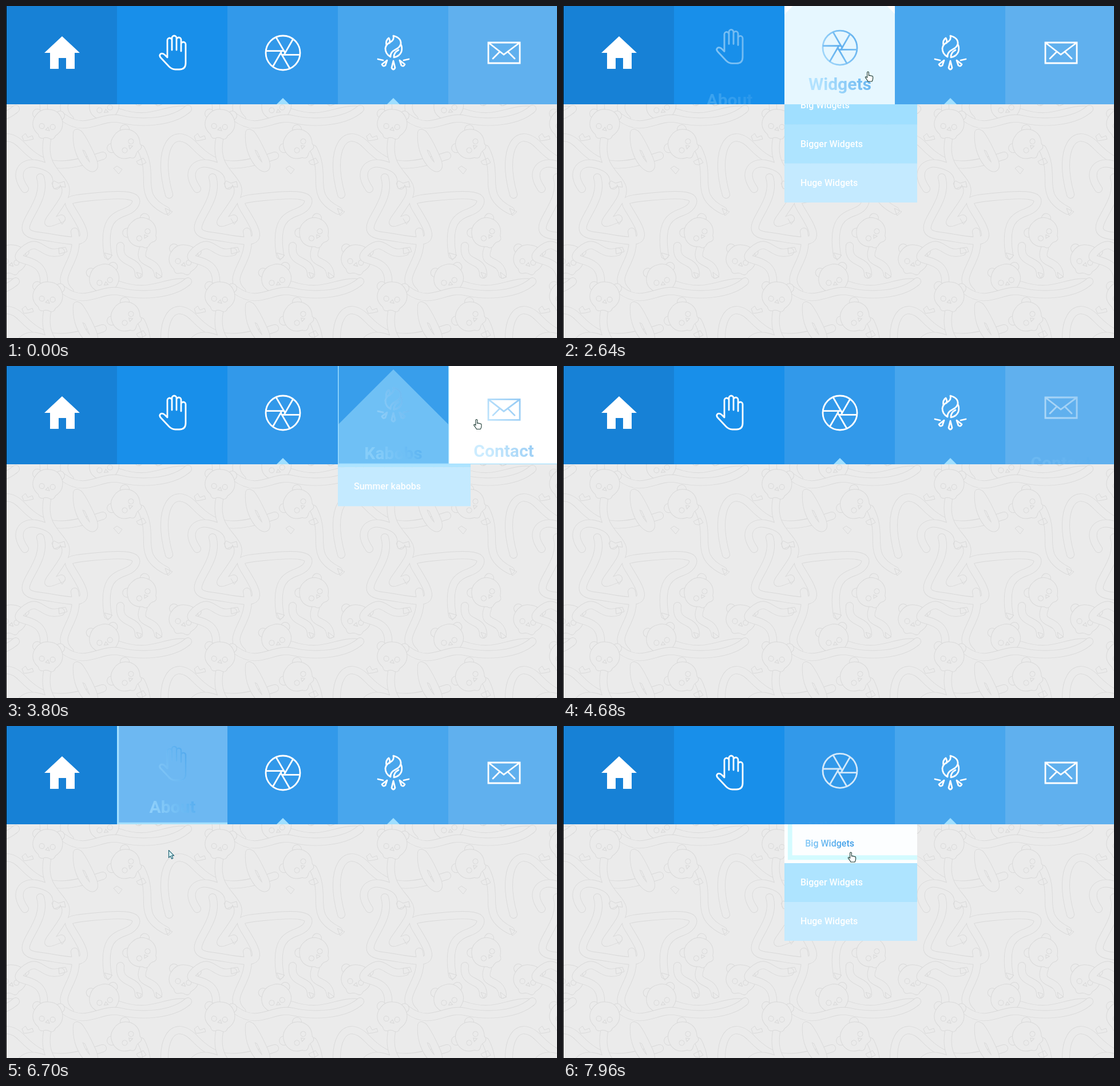
Write an HTML page that moves like this. It is 963x581 px and loops after 8000 ms.

```html
<!DOCTYPE html>
<html lang="en">
<head>
<meta charset="utf-8">
<title>Sliding tab menu</title>
<style>
  html, body { margin: 0; width: 100%; height: 100%; overflow: hidden; background: #000; }
  #stage { display: block; font-family: Roboto, sans-serif; }
  .line { fill: none; stroke: #d9d9d9; stroke-width: 1; }
  .tube use { fill: none; stroke-linecap: round; }
  .head { fill: #ebebeb; stroke: #d9d9d9; }
  .icon { stroke-width: 2.8; stroke-linejoin: round; stroke-linecap: round; }
  .white { fill: none; stroke: #fff; }
  .tint { fill: none; stroke: url(#sky); }
  .white.solid { fill: #fff; stroke: none; }
  .tint.solid { fill: url(#sky); stroke: none; }
  .label { font-size: 30px; font-weight: 700; text-anchor: middle; fill: url(#sky); }
  .item { font-size: 16px; font-weight: 500; fill: #fff; }
  .item.on { fill: url(#ink); }
</style>
</head>
<body>
<svg id="stage" width="963" height="581" viewBox="0 0 963 581">
  <defs>
    <linearGradient id="sky" gradientUnits="userSpaceOnUse" x1="-48" y1="115" x2="42" y2="70">
      <stop stop-color="#a0dcff"/><stop offset="1" stop-color="#2a94e8"/>
    </linearGradient>
    <linearGradient id="ink">
      <stop stop-color="#86caf7"/><stop offset="1" stop-color="#3498e6"/>
    </linearGradient>

    <!-- icons, centred on x = 0 -->
    <path id="home" d="M0 53 L31 82 H22 V110 H7 V91 H-6 V110 H-21 V82 H-31Z"/>
    <path id="hand" d="M-9 90 V60 a4 4 0 0 1 8 0 V77 V56 a4 4 0 0 1 8 0 V77 V59 a4 4 0 0 1 8 0 V79 V67
      a4 4 0 0 1 8 0 V100 Q23 111 12 111 H5 Q-1 111 -6 106 L-20 91 Q-24 87 -21 84 Q-18 82 -14 85 Z"/>
    <g id="lens"><circle cy="82" r="30"/></g>
    <g id="fire">
      <path d="M-5 89 Q-14 84 -14 74 Q-13 67 -5 63 Q2 59 0 52 Q14 56 13 66 Q12 72 4 76 Q-6 81 -5 89Z"/>
      <path d="M13 67 Q16 73 14 80 Q11 88 1 90 Q0 82 9 77"/>
      <path d="M-12 69 Q-14 60 -8 56 Q-5 61 -7 65"/>
      <path d="M0 96 L-3 108 Q0 114 3 108Z M-11 95 L-20 102 Q-18 107 -14 104Z M11 95 L20 102 Q18 107 14 104Z"/>
      <path d="M-27 93 L-18 95 M27 93 L18 95"/>
    </g>
    <path id="mail" stroke-linejoin="miter" d="M-27 64 H28 V100 H-27Z L0 85 L28 64 M-19 92 L-8 81 M19 92 L8 81"/>

    <!-- wallpaper of doodled creatures on snaking limbs -->
    <path id="limbs" d="M72 233 C60 300 125 300 98 342 S62 385 97 372
      M100 195 C140 225 165 190 200 198 S290 205 318 180
      M236 250 C262 300 225 330 280 358
      M285 330 C262 250 292 205 330 245 S400 285 470 262
      M60 300 C75 350 0 395 55 402 S152 425 130 382 S92 340 150 334 S238 330 224 350 S165 352 178 436
      M120 395 C132 450 80 470 112 500
      M66 486 C70 430 0 455 30 428 S60 440 96 430
      M197 488 C255 508 275 480 316 484
      M200 420 C196 455 232 440 232 470 M240 424 C228 456 262 440 266 470
      M33 320 C12 290 30 272 52 276 S92 290 88 314
      M138 247 C115 205 132 225 150 265 S120 275 124 222"/>
    <path id="bones" d="M28 228 l6 -5 l4 7 l8 -3 l2 6 l-9 2 l-8 1z M228 272 l12 -6 l5 8 l-8 4 l-6 -1z
      M188 284 l6 -4 l9 6 l-6 8z M80 310 l4 -4 l8 4 l10 -3 l2 10 l-10 -1 l-10 4z M92 424 l12 -2 l3 8 l-14 4z
      M92 372 l6 10 l6 -8 M278 354 l13 6 l-8 7z M172 432 l14 4 l-8 9z M228 466 l9 3 l-4 8z M262 466 l11 8 l-9 3z"/>
    <g id="doodle">
      <g class="tube">
        <use href="#limbs" stroke="#d9d9d9" stroke-width="14"/>
        <use href="#limbs" stroke="#ebebeb" stroke-width="12.2"/>
      </g>
      <use href="#bones" class="line"/>
      <g id="heads"></g>
    </g>
    <pattern id="paper" width="301" height="302" patternUnits="userSpaceOnUse"></pattern>

    <path id="arrow" d="M0 0 V13 L3 10.2 L5.2 15 L7.4 14 L5.2 9.4 H9.2Z"/>
    <path id="point" d="M-1.4 1 Q0 -1 1.4 1 V7 Q3 5.5 4 7.3 Q5.6 6 6.4 7.8 Q8.4 7 8.6 9.2 V12 Q8.4 14.4 7 17 H0
      Q-1.6 13.6 -4.4 10.6 Q-5.2 8.4 -3.2 8.8 L-1.4 10.4Z"/>
  </defs>

  <rect x="1" width="962" height="581" fill="#ebebeb"/>
  <rect x="1" y="172" width="962" height="409" fill="url(#paper)"/>
  <g id="menus"></g>
  <g id="tabs"></g>
  <g id="cursor" stroke-width="1.1" stroke-linejoin="round">
    <use href="#arrow" fill="#d8f2f5" stroke="#1c5f70"/>
    <use href="#point" fill="#fff" stroke="#1c3a33"/>
  </g>
</svg>

<script>
const LOOP = 8000, TAB = 193, BAR = 172, ROW = 68;
const $ = id => document.getElementById(id);

function add(parent, tag, attrs = {}, text) {
  const el = document.createElementNS('http://www.w3.org/2000/svg', tag);
  set(el, attrs);
  if (text) el.textContent = text;
  parent.append(el);
  return el;
}
function set(el, attrs) {
  for (const k in attrs) el.setAttribute(k, attrs[k]);
}

// Hover spans are [in, out] in ms.
const tabs = [
  { name: 'Home', icon: 'home', rgb: [23, 129, 214], hover: [[1200, 1960], [5150, 5480]] },
  { name: 'About', icon: 'hand', rgb: [24, 143, 234], hover: [[1960, 2540], [6340, 6665]] },
  { name: 'Widgets', icon: 'lens', rgb: [50, 153, 234], hover: [[2540, 3202], [7300, 7760]],
    open: [[2540, 3202], [7300, 9000]], items: ['Big Widgets', 'Bigger Widgets', 'Huge Widgets'] },
  { name: 'Kabobs', icon: 'fire', rgb: [72, 166, 237], hover: [[3202, 3740]],
    open: [[3202, 3740]], items: ['Shishkabobs', 'BBQ kabobs', 'Summer kabobs'] },
  { name: 'Contact', icon: 'mail', rgb: [96, 176, 238], hover: [[3740, 4560]] }
];
const itemHover = [[7760, 9000]];

// Pointer path: time, x, y.
const path = [
  [850, 120, 388], [1200, 75, 172], [1480, 38, 145], [1780, 38, 140], [1960, 194, 115],
  [2150, 290, 118], [2460, 300, 118], [2540, 387, 118], [2640, 533, 115], [3100, 545, 110],
  [3202, 580, 104], [3280, 685, 97], [3650, 690, 97], [3740, 773, 95], [3860, 870, 92],
  [4510, 872, 90], [4560, 963, 70], [4800, 130, 415], [5150, 90, 172], [5270, 85, 120],
  [5370, 85, 120], [5480, 100, 172], [5700, 180, 300], [6140, 264, 333], [6220, 264, 333],
  [6340, 280, 172], [6450, 285, 120], [6570, 285, 120], [6665, 284, 172], [6700, 284, 217],
  [7000, 408, 358], [7080, 408, 358], [7300, 450, 172], [7420, 470, 120], [7640, 482, 120],
  [7760, 494, 172], [7960, 503, 221], [8000, 503, 221]
];

const clamp = v => Math.max(0, Math.min(1, v));
const easeOut = power => ms => 1 - (1 - clamp(ms / 300)) ** power;
const kick = ms => Math.max(0, 1 - Math.abs(ms - 78) / 20);
const slide = easeOut(3.3), lift = easeOut(1.5), drop = easeOut(4.5);
const flash = ms => clamp(ms / 57) + 0.6 * kick(ms);
const rimIn = ms => 6 * clamp((ms - 100) / 100) + 9 * kick(ms);
const rimOut = ms => clamp(ms / 80);

// Value of a hover transition at time t: 0 at rest, 1 hovered.
function state(spans, t, enter, leave = enter) {
  const span = spans.filter(s => s[0] <= t).pop();
  if (!span) return 0;
  const v = enter(Math.min(t, span[1]) - span[0]);
  return t > span[1] ? v * (1 - leave(t - span[1])) : v;
}

function buildPaper() {
  for (const [x, y, turn] of [[73, 207, 5], [210, 242, -55], [238, 397, -40], [311, 444, 8], [172, 478, -15]]) {
    const g = add($('heads'), 'g', { class: 'head', transform: `translate(${x} ${y}) rotate(${turn})` });
    add(g, 'circle', { cx: -20, cy: -17, r: 8 });
    add(g, 'circle', { cx: 20, cy: -17, r: 8 });
    add(g, 'path', { d: 'M-15 19 Q-30 8 -25 -8 Q-17 -27 0 -26 Q18 -27 25 -8 Q29 8 15 19 Q13 27 6 25 Q0 22 -6 25 Q-13 27 -15 19Z' });
    add(g, 'circle', { cx: -10, cy: 4, r: 4.5 });
    add(g, 'circle', { cx: 9, cy: 4, r: 4.5 });
    add(g, 'path', { d: 'M-3 10 L1 5 L4 11Z' });
  }
  for (const dy of [-302, 0])
    for (const dx of [-301, 0, 301])
      add($('paper'), 'use', { href: '#doodle', x: dx, y: dy });
}

function buildTab(tab, i) {
  const x = 1 + TAB * i;
  const box = add($('tabs'), 'svg', { x, width: TAB, height: BAR, viewBox: `-97 0 ${TAB} ${BAR}` });
  tab.back = add(box, 'rect', { x: -97, width: TAB, height: BAR });
  tab.rim = add(box, 'path');
  if (tab.items) tab.tip = add(box, 'path', { fill: '#a0dfff' });
  const solid = tab.icon === 'home' ? ' solid' : '';
  tab.white = add(box, 'use', { href: '#' + tab.icon, class: 'icon white' + solid });
  tab.tint = add(box, 'use', { href: '#' + tab.icon, class: 'icon tint' + solid });
  tab.label = add(box, 'text', { class: 'label' }, tab.name);
  if (tab.items) buildMenu(tab, x);
}

function buildMenu(tab, x) {
  const box = add($('menus'), 'svg', { x, y: BAR, width: 232, height: 3 * ROW });
  tab.menu = add(box, 'g');
  tab.items.forEach((name, i) => {
    add(tab.menu, 'rect', { y: i * ROW, width: 232, height: ROW, fill: ['#a0dfff', '#aee4ff', '#c4eaff'][i] });
    add(tab.menu, 'text', { class: 'item', x: 28, y: i * ROW + 39 }, name);
  });
}

function buildItemHover(tab) {
  const g = add(tab.menu, 'g');
  add(g, 'rect', { width: 232, height: ROW, fill: '#fff' });
  const rim = add(g, 'path', { fill: '#d5fcff' });
  const text = add(g, 'text', { class: 'item on', y: 39 }, tab.items[0]);
  return { g, rim, text };
}

for (let k = 0; k < 6; k++)
  add($('lens'), 'path', { d: 'M-29 -3.3 H2', transform: `translate(0 82) rotate(${k * 60})` });
buildPaper();
tabs.forEach(buildTab);
const big = buildItemHover(tabs[2]);

function drawTab(tab, t) {
  const p = state(tab.hover, t, slide), up = state(tab.hover, t, lift);
  const glow = state(tab.hover, t, flash), rim = state(tab.hover, t, rimIn, rimOut);
  const rgb = tab.rgb.map(c => Math.round(clamp((c + (255 - c) * glow) / 255) * 255));
  set(tab.back, { fill: `rgb(${rgb})` });
  set(tab.rim, {
    d: `M-97 0 h${rim} V${BAR - rim} H96 V${BAR} H-97Z`,
    fill: rim > 6.1 ? '#dfffff' : '#a3e0ff'
  });
  const lifted = `translate(0 ${-19.5 * up})`;
  set(tab.white, { transform: lifted, opacity: 1 - up });
  set(tab.tint, { transform: lifted, opacity: p });
  set(tab.label, { y: 190.5 - 59 * p, opacity: p });
  if (!tab.items) return;
  const m = state(tab.open, t, slide), h = 11 + 328 * m;
  set(tab.tip, { d: `M0 ${BAR - h} L${h} ${BAR} H${-h}Z`, opacity: 1 - m });
  set(tab.menu, { transform: `translate(0 ${-3 * ROW * (1 - state(tab.open, t, drop))})` });
}

function drawItem(t) {
  const p = state(itemHover, t, slide), a = 6 * p, b = 14 * p;
  set(big.g, { opacity: p });
  set(big.rim, { d: `M${a} 0 H${b} V${ROW - b} H232 V${ROW - a} H${a}Z` });
  set(big.text, { x: 28 + 8.5 * p });
}

function drawCursor(t) {
  const shown = t >= 850 && (t < 4560 || t >= 4800);
  const i = Math.max(1, path.findIndex(q => q[0] > t));
  const [t0, x0, y0] = path[i - 1], [t1, x1, y1] = path[i];
  const k = clamp((t - t0) / (t1 - t0));
  const x = x0 + (x1 - x0) * k, y = y0 + (y1 - y0) * k;
  const hand = y < BAR || t > 7300;
  set($('cursor'), { transform: `translate(${x} ${y})`, visibility: shown ? 'visible' : 'hidden' });
  const [arrow, point] = $('cursor').children;
  set(arrow, { opacity: hand ? 0 : 1 });
  set(point, { opacity: hand ? 1 : 0 });
}

const start = performance.now();
function frame() {
  const t = (performance.now() - start) % LOOP;
  tabs.forEach(tab => drawTab(tab, t));
  drawItem(t);
  drawCursor(t);
  requestAnimationFrame(frame);
}
frame();
</script>
</body>
</html>
```
